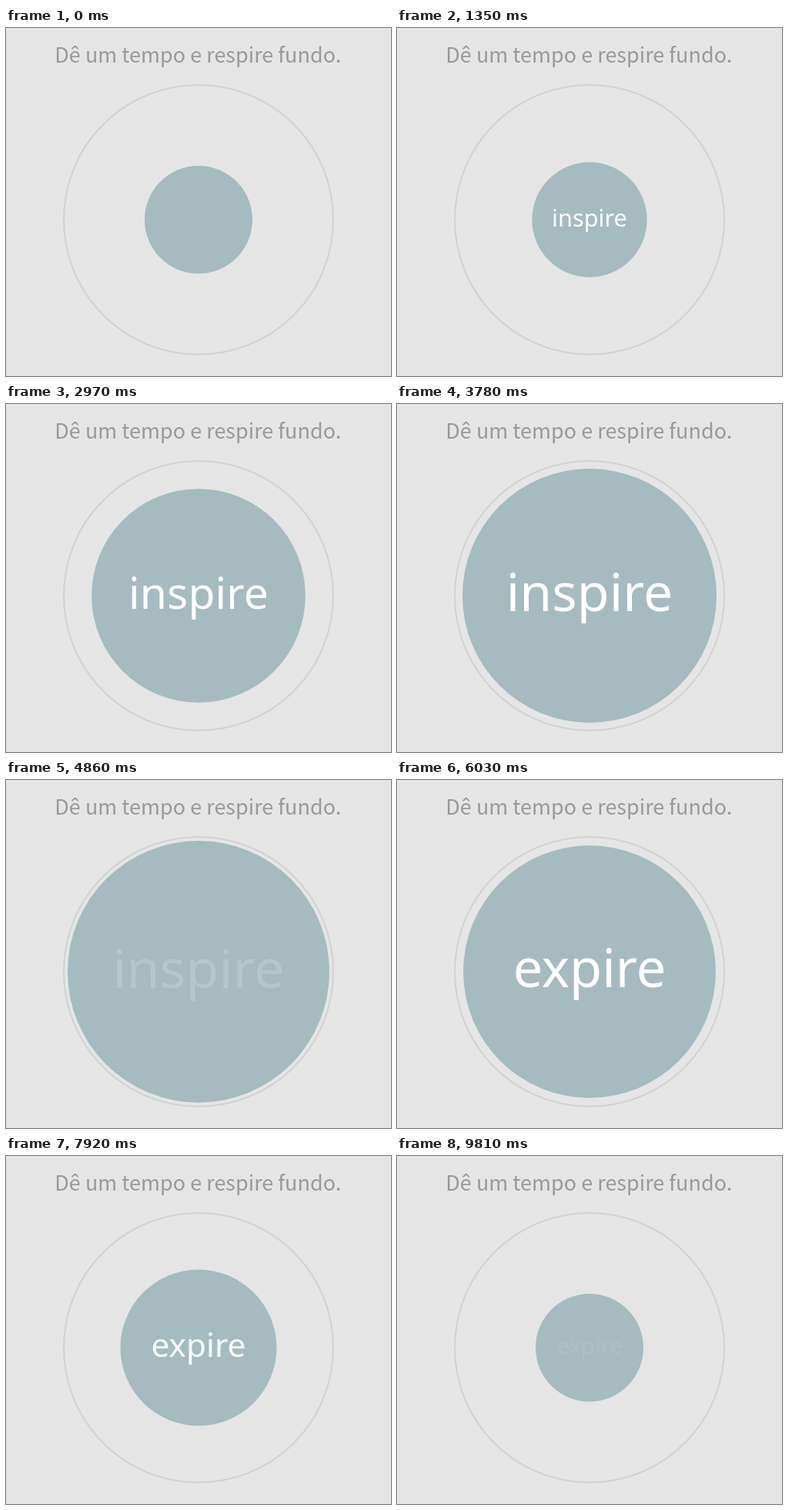
An HTML page for the animation above (9.9 s loop, 500 by 452 pixels).

```html
<!DOCTYPE html>
<html lang="pt">
<head>
<meta charset="utf-8">
<style>
  html, body { margin: 0; width: 100%; height: 100%; overflow: hidden; background: #e5e5e5; }
  svg { display: block; width: 100vw; height: 100vh; }
  text { text-anchor: middle; }
  .title { font: 27px "Noto Sans CJK JP", "Noto Sans CJK SC", "Noto Sans CJK", sans-serif; fill: #999; }
  .word { font-family: "Noto Sans", "Open Sans", sans-serif; fill: #fff; }
</style>
</head>
<body>
<svg viewBox="0 0 500 452">
  <text class="title" x="249.3" y="45">Dê um tempo e respire fundo.</text>
  <circle cx="250" cy="249" r="175" fill="none" stroke="#d0d2d2" stroke-width="2"/>
  <g id="disc">
    <circle r="170" fill="#a5bbbf"/>
    <text class="word" id="inhale" y="20.5" font-size="70">inspire</text>
    <text class="word" id="exhale" y="20.5" font-size="71">expire</text>
  </g>
</svg>
<script>
const LOOP = 9900, STEP = 90, HALF = LOOP / 2, FADE = 500;
const SMALL = 70, BIG = 170;
const [disc, inhale, exhale] = ["disc", "inhale", "exhale"].map(id => document.getElementById(id));

const clamp = v => Math.min(1, Math.max(0, v));
const ramp = (t, from, to) => clamp((t - from) / (to - from));

// cubic-bezier(.42, 0, .58, 1), solved by bisection
function easeInOut(x) {
  let lo = 0, hi = 1;
  for (let i = 0; i < 24; i++) {
    const s = (lo + hi) / 2, q = 1 - s;
    if (1.26 * s * q * q + 1.74 * s * s * q + s ** 3 < x) lo = s; else hi = s;
  }
  return lo * lo * (3 - 2 * lo);
}

const fade = (t, start, end) => Math.min(ramp(t, start, start + FADE), 1 - ramp(t, end - FADE, end));

function draw(t) {
  const open = easeInOut(ramp(t, 815, 4332)) - easeInOut(ramp(t, 5284, 9599));
  const r = SMALL + (BIG - SMALL) * open;
  disc.setAttribute("transform", `translate(250 249) scale(${r / BIG})`);
  inhale.setAttribute("opacity", fade(t, 0, HALF));
  exhale.setAttribute("opacity", fade(t, HALF, LOOP - 50));
}

const start = performance.now();
function tick(now) {
  const t = Math.max(0, now - start) % LOOP;
  draw(Math.floor(t / STEP) * STEP);
  requestAnimationFrame(tick);
}
draw(0);
requestAnimationFrame(tick);
</script>
</body>
</html>
```
